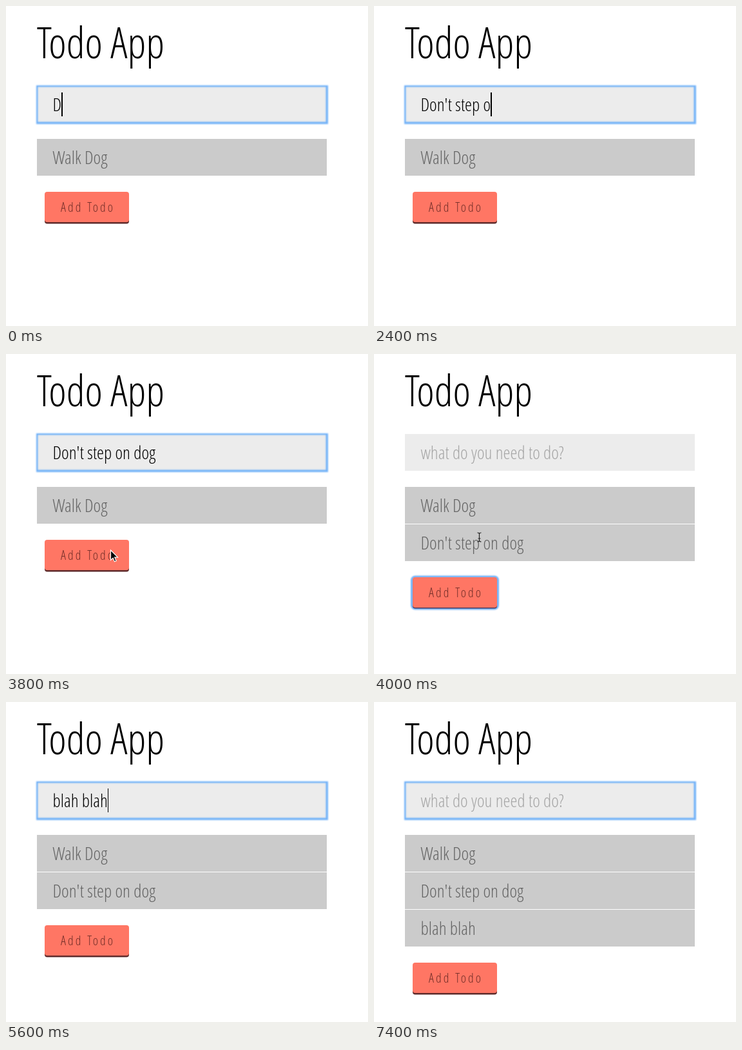
An HTML page for the animation above (7800 ms loop, 562x496 px).

```html
<!DOCTYPE html>
<html lang="en">
<head>
<meta charset="utf-8">
<title>Todo App</title>
<style>
  html, body { margin: 0; width: 100%; height: 100%; overflow: hidden; background: #fff; }
  body {
    position: relative;
    font: 300 28px "Open Sans Condensed Light", "Open Sans", sans-serif;
    font-stretch: 75%;
  }
  h1, .field, .list, .add, .cursor { position: absolute; margin: 0; }
  h1, .field, .item, .add { white-space: pre; }
  h1 { left: 48px; top: 15px; font-size: 66px; font-weight: 300; line-height: 81px; color: #000; }
  .field, .item {
    box-sizing: border-box; width: 450px; height: 57px;
    padding-left: 24.5px; line-height: 57px;
  }
  .field { left: 48px; top: 124px; background: #ececec; color: #000; }
  .field.focus { box-shadow: 0 0 2px 1.5px #74b3f8, inset 0 0 2px 1.5px #74b3f8; }
  .hint { color: #a6a6a6; }
  .caret { position: absolute; top: 10px; width: 1.4px; height: 37px; background: #000; }
  .list { left: 48px; top: 206px; }
  .item { margin-bottom: 1px; background: #cbcbcb; color: #646464; }
  .add {
    left: 60px; width: 131px; height: 47px; box-sizing: border-box; padding-left: 25px;
    font-size: 20px; line-height: 47px; letter-spacing: 3px;
    color: #74302a; background: #ff7664; border-radius: 4px;
    box-shadow: 0 2.5px 0 #5f2a2a;
  }
  .add.focus { box-shadow: 0 1.5px 0 #4d3a5c, 0 0.5px 2px 3px #74b3f8; }
  .cursor { left: 0; top: 0; overflow: visible; }
  [hidden] { display: none; }
</style>
</head>
<body>
<h1>Todo App</h1>
<div class="field"><span id="typed"></span><i class="caret"></i><span class="hint">what do you need to do?</span></div>
<div class="list">
  <div class="item">Walk Dog</div>
  <div class="item">Don't step on dog</div>
  <div class="item">blah blah</div>
</div>
<div class="add">Add Todo</div>
<svg class="cursor" width="1" height="1">
  <path id="arrow" d="M0 0V15.5L3.6 12.2L6 17.8L8.6 16.7L6.2 11.2H11Z" fill="#000" stroke="#fff" stroke-width="1.2"/>
  <path id="beam" d="M-3 -7Q0 -7 0 -5Q0 -7 3 -7M0 -5V5M-3 7Q0 7 0 5Q0 7 3 7M-2 2H2" fill="none" stroke="#222" stroke-width="1.2"/>
</svg>
<script>
  const LOOP = 7800;
  const $ = s => document.querySelector(s);
  const field = $('.field'), typed = $('#typed'), caret = $('.caret'), hint = $('.hint');
  const add = $('.add'), items = document.querySelectorAll('.item');
  const pointers = { arrow: $('#arrow'), beam: $('#beam') };

  // [start ms, full state]; each step changes the state before it
  const steps = [];
  const at = (ms, change) => steps.push([ms, { ...(steps.length ? steps.at(-1)[1] : {}), ...change }]);
  const type = (ms, text) => at(ms, { text, caret: true, pointer: null });
  const blink = (ms, on) => at(ms, { caret: on });

  at(0, { text: 'D', caret: true, focus: 'field', count: 1, pointer: null });
  type(600, 'Do');
  type(800, 'Don\'');
  type(1000, 'Don\'t ');
  type(1200, 'Don\'t st');
  blink(1600, false);
  type(1800, 'Don\'t ste');
  type(2000, 'Don\'t step');
  type(2200, 'Don\'t step ');
  type(2400, 'Don\'t step o');
  type(2600, 'Don\'t step on');
  type(2800, 'Don\'t step on d');
  type(3000, 'Don\'t step on do');
  type(3200, 'Don\'t step on dog');
  at(3600, { caret: false, pointer: ['arrow', 162.5, 304] });
  at(4000, { text: '', focus: 'add', count: 2, pointer: ['beam', 163.5, 284] });
  at(4200, { pointer: ['beam', 166, 215] });
  at(4400, { pointer: ['beam', 168, 158] });
  at(4600, { focus: 'field', caret: true });
  type(4800, 'b');
  type(5000, 'bl');
  type(5200, 'blah');
  type(5400, 'blah b');
  type(5600, 'blah blah');
  at(5800, { text: '', count: 3 });
  blink(6400, false);
  blink(6800, true);
  blink(7400, false);

  function show(s) {
    typed.textContent = s.text;
    caret.hidden = !s.caret;
    hint.hidden = s.text !== '';
    field.classList.toggle('focus', s.focus === 'field');
    add.classList.toggle('focus', s.focus === 'add');
    items.forEach((item, i) => item.hidden = i >= s.count);
    add.style.top = 230 + 58 * s.count + 'px';
    for (const name in pointers) {
      const on = s.pointer && s.pointer[0] === name;
      pointers[name].style.display = on ? '' : 'none';
      if (on) pointers[name].setAttribute('transform', `translate(${s.pointer[1]} ${s.pointer[2]})`);
    }
  }

  const start = performance.now();
  let current;
  function tick() {
    const t = (performance.now() - start) % LOOP;
    const state = steps.findLast(([ms]) => ms <= t)[1];
    if (state !== current) show(current = state);
    requestAnimationFrame(tick);
  }
  tick();
</script>
</body>
</html>
```
